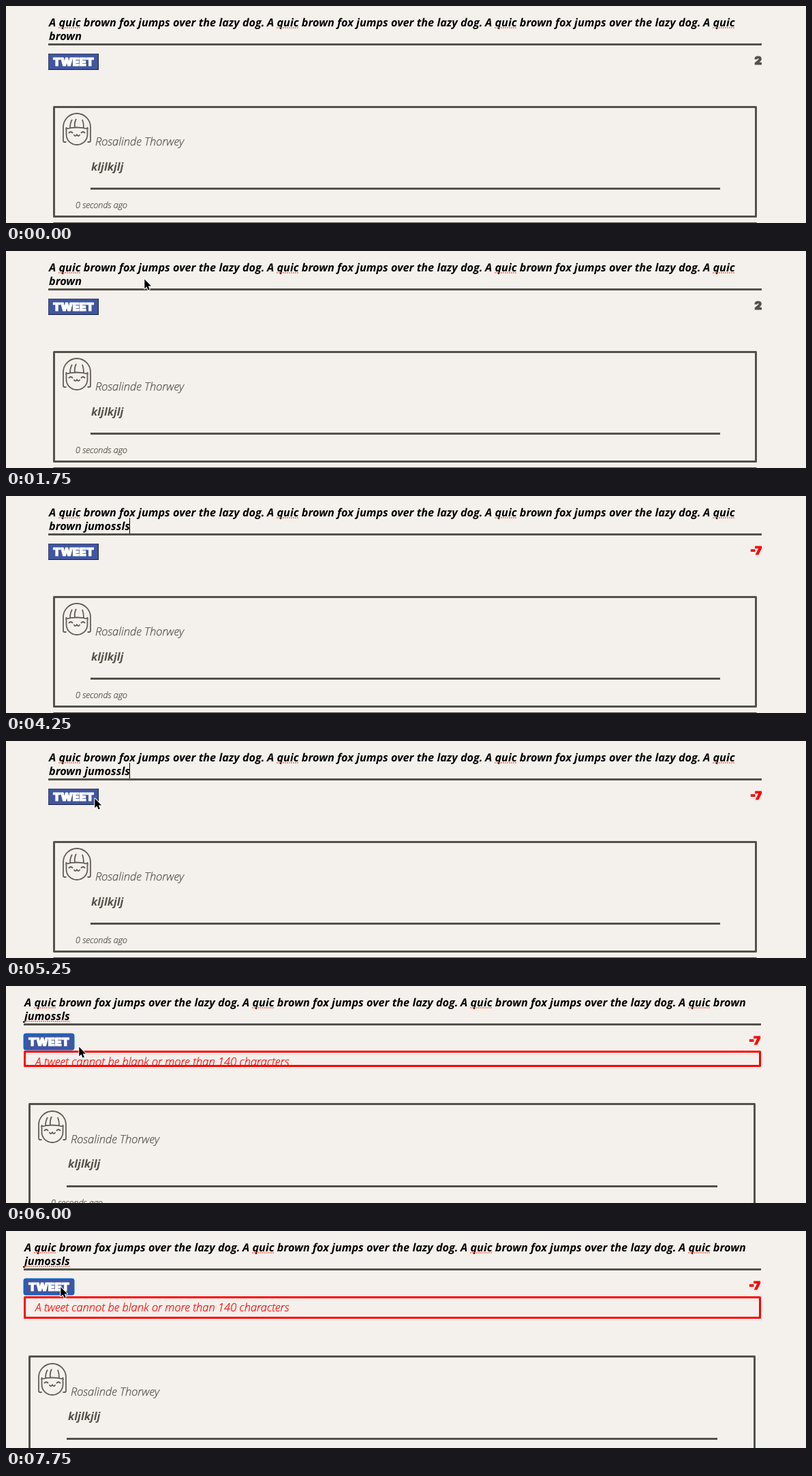
An HTML page with a canvas that plays this animation: 1174x319 px, repeating every 8000 ms.

```html
<!DOCTYPE html>
<html lang="en">
<head>
<meta charset="utf-8">
<title>Character limit form</title>
<style>
  html, body { margin: 0; width: 100%; height: 100%; overflow: hidden; background: #f4f0eb; }
  canvas { display: block; width: 1174px; height: 319px; }
</style>
</head>
<body>
<canvas id="stage" width="1174" height="319"></canvas>
<script>
const ctx = document.getElementById('stage').getContext('2d');
ctx.textRendering = 'geometricPrecision';

const LOOP = 8000;
const INK = '#545149', RED = '#ff0000', PAPER = '#f4f0eb';
const BOLD = 'italic 700 16.25px "Open Sans", sans-serif';
const LIGHT = 'italic 300 16.55px "Open Sans", sans-serif';
const SMALL = 'italic 300 12.6px "Open Sans", sans-serif';
const BLOCK = '900 16.3px Inter, sans-serif';
const SENTENCE = 'A quic brown fox jumps over the lazy dog.';
const SENTENCE_STEP = 320;
const DRAFT = ' jumossls';
const LIMIT_LEFT = 2;

// Steps: [start ms, ...values]
const TYPED = [[0, 0], [2000, 1], [2500, 2], [3250, 4], [3500, 5], [3750, 6], [4000, 7], [4250, 9]];
const CARET = [[0, false], [1250, true], [1750, false], [2000, true], [3000, false],
  [3250, true], [4750, false], [5250, true], [5750, false]];
const POINTER = [[0], [750, 'arrow', 269, 24], [1000, 'arrow', 208, 38], [1250, 'arrow', 204, 40],
  [1500, 'arrow', 202, 40], [2000], [5000, 'beam', 203, 30], [5250, 'arrow', 129, 83],
  [5500, 'arrow', 108, 88], [5750, 'arrow', 106, 88], [7000, 'arrow', 103, 88],
  [7250, 'arrow', 91, 84], [7500, 'arrow', 84, 81], [7750, 'arrow', 79, 81]];

const WIDE = 6000, OPENED = 6250, SPELLED = 5500, FOCUSED = 5750;

const ARROW = new Path2D('M1.3 1.5V15.3L4.5 12.4L6.6 17.4L8.9 16.4L6.8 11.6H11.1Z');
const BEAM = new Path2D('M1 1Q4.5 1 4.5 4V14Q4.5 17 1 17M8 1Q4.5 1 4.5 4M4.5 14Q4.5 17 8 17M3 11H6');
const FACE = new Path2D(
  'M5.5 43H3Q1 43 1 41V21A20 20 0 0 1 41 21V41Q41 43 39 43H36.5' +
  'M5.5 21V32A15.5 15 0 0 0 36.5 32V21M4 24Q21 19 38 24' +
  'M14 10Q11 15 11 22M20 9Q17 15 18 21M29 10Q31 15 31 22' +
  'M9 30q3 -4 6 0M27 30q3 -4 6 0M16.5 32q2.2 4 4.5 0q2.2 4 4.5 0');

const stepAt = (steps, t) => steps.findLast(s => s[0] <= t).slice(1);

function rect(x, y, w, h, color) {
  ctx.fillStyle = color;
  ctx.fillRect(x, y, w, h);
}

function frame(left, top, right, bottom, color) {
  ctx.strokeStyle = color;
  ctx.lineWidth = 3;
  ctx.strokeRect(left + 1.5, top + 1.5, right - left - 3, bottom - top - 3);
}

function text(str, x, y, font, color, { align = 'left', thicken = 0 } = {}) {
  ctx.font = font;
  ctx.textAlign = align;
  ctx.fillStyle = ctx.strokeStyle = color;
  ctx.fillText(str, x, y);
  if (thicken) {
    ctx.lineWidth = thicken;
    ctx.strokeText(str, x, y);
  }
}

const lightText = (str, x, y, font, color) => text(str, x, y, font, color, { thicken: 0.25 });
const blockText = (str, x, y, color, align) => text(str, x, y, BLOCK, color, { align, thicken: 1.2 });

function widthOf(str) {
  ctx.font = BOLD;
  return ctx.measureText(str).width;
}

function misspelling(x, y, width) {
  ctx.strokeStyle = '#f2604f';
  ctx.lineWidth = 1.7;
  ctx.setLineDash([1.8, 1.2]);
  ctx.beginPath();
  ctx.moveTo(x, y);
  ctx.lineTo(x + width, y);
  ctx.stroke();
  ctx.setLineDash([]);
}

function drawInput(t, left, right, wide) {
  const x = left + 1;
  for (let i = 0; i < 4; i++) {
    const start = x + i * SENTENCE_STEP;
    const last = wide ? 'A quic brown' : 'A quic';
    text(i < 3 ? SENTENCE : last, start, 30, BOLD, '#000');
    misspelling(start + 14, 32, 32);
  }

  const [count] = stepAt(TYPED, t);
  const line = wide ? DRAFT.trim() : 'brown' + DRAFT.slice(0, count);
  text(line, x, 50, BOLD, '#000');
  if (t >= SPELLED) misspelling(x + (wide ? 0 : widthOf('brown ')), 52, 67);
  if (stepAt(CARET, t)[0]) rect(Math.floor(x + widthOf(line)), 32, 1, 23, '#000');

  rect(left, 55, right - left, 3, INK);
  const remaining = LIMIT_LEFT - count;
  blockText(String(remaining), right - (wide ? 1 : 0), 85.5, remaining < 0 ? RED : INK, 'right');
}

function drawButton(x, focused) {
  if (focused) {
    ctx.fillStyle = '#0b66cb';
    ctx.beginPath();
    ctx.roundRect(x - 0.5, 69.5, 75, 25, 4);
    ctx.fill();
    rect(x + 1.5, 71.5, 71, 21, '#4056a1');
  } else {
    rect(x, 70, 74, 24, '#141c40');
    rect(x, 70, 73, 23, '#3a4670');
    rect(x + 1, 71, 72, 22, '#4056a1');
  }
  blockText('TWEET', x + 37, 87.7, '#fff', 'center');
}

function drawError(open) {
  const top = open ? 96 : 95, bottom = open ? 129 : 119;
  ctx.save();
  ctx.beginPath();
  ctx.rect(29, top + 3, 1076, bottom - top - 6);
  ctx.clip();
  lightText('A tweet cannot be blank or more than 140 characters', 43, top + 22, LIGHT, RED);
  ctx.restore();
  frame(26, top, 1108, bottom, RED);
}

function drawCard(top, wide) {
  const left = wide ? 33 : 69, right = wide ? 1100 : 1102;
  const ruleLeft = wide ? 89 : 124, ruleRight = wide ? 1044 : 1048;
  const slack = wide ? 1 : 0;
  frame(left, top, right, top + 164, INK);
  frame(left, top + 171, right, top + 335, INK);

  ctx.save();
  ctx.translate(left + 14, top + 10 + slack);
  ctx.strokeStyle = '#625e57';
  ctx.lineWidth = 1.8;
  ctx.stroke(FACE);
  ctx.restore();

  lightText('Rosalinde Thorwey', left + 62, top + 58 + slack, LIGHT, INK);
  text('kljlkjlj', ruleLeft + 1 + slack, top + 95, BOLD, INK);
  rect(ruleLeft, top + 120 + slack, ruleRight - ruleLeft, 3, INK);
  lightText('0 seconds ago', left + 33, top + 150 + slack, SMALL, INK);
}

function drawPointer(kind, x, y) {
  if (!kind) return;
  ctx.save();
  ctx.translate(x, y);
  if (kind === 'arrow') {
    ctx.strokeStyle = '#fff';
    ctx.lineWidth = 2;
    ctx.stroke(ARROW);
    ctx.fillStyle = '#000';
    ctx.fill(ARROW);
  } else {
    ctx.strokeStyle = '#000';
    ctx.lineWidth = 1;
    ctx.stroke(BEAM);
  }
  ctx.restore();
}

function draw(t) {
  const wide = t >= WIDE, open = t >= OPENED;
  const left = wide ? 26 : 62, right = wide ? 1108 : 1109;
  rect(0, 0, 1174, 319, PAPER);
  drawInput(t, left, right, wide);
  drawButton(left, t >= FOCUSED);
  if (wide) drawError(open);
  drawCard(open ? 183 : wide ? 172 : 147, wide);
  drawPointer(...stepAt(POINTER, t));
}

ctx.lineJoin = 'round';
const start = performance.now();
function tick() {
  draw((performance.now() - start) % LOOP);
  requestAnimationFrame(tick);
}
tick();
</script>
</body>
</html>
```
